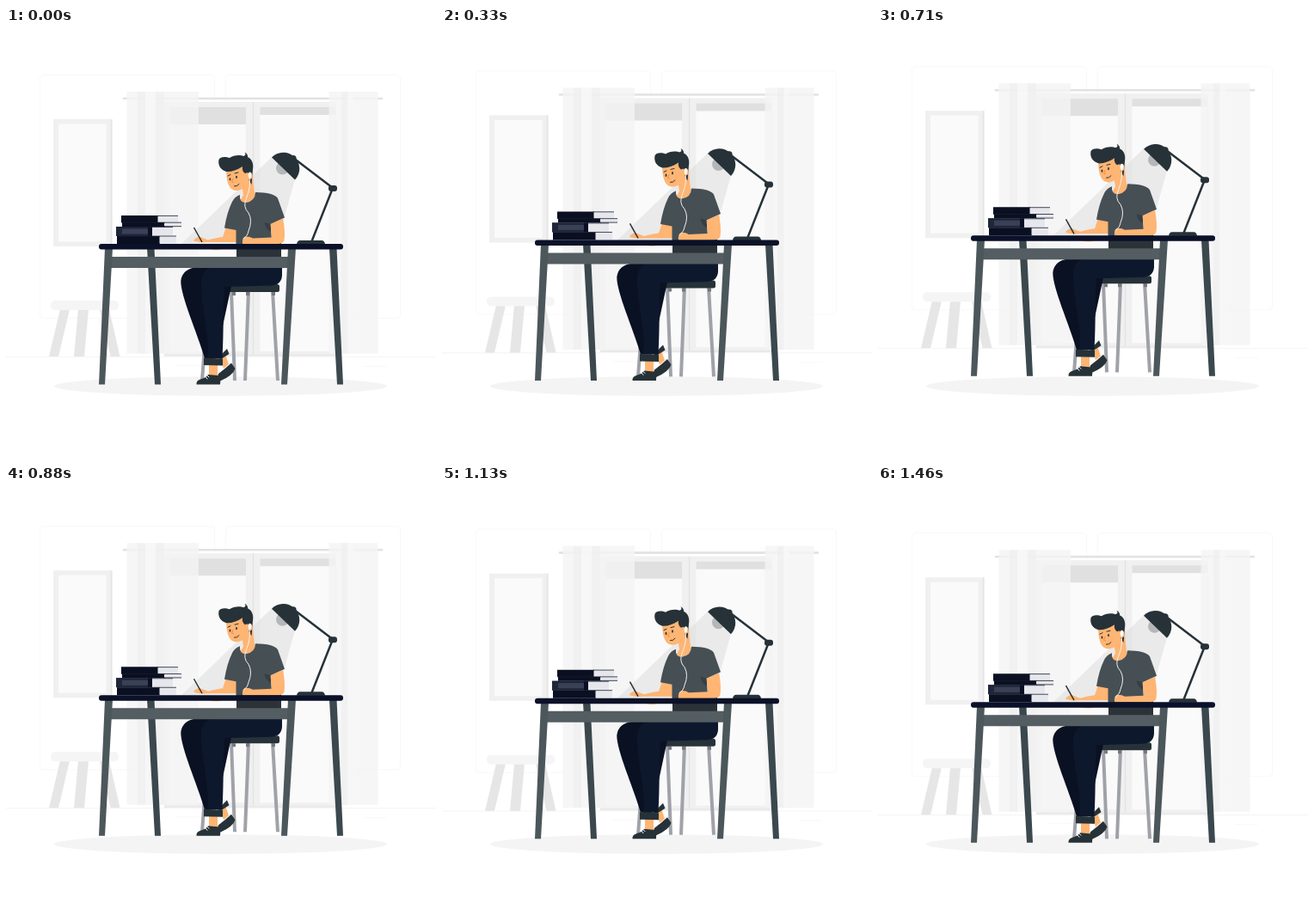
Write an HTML page that moves like this. It is 500x500 px and loops after 1500 ms.

```html
<!DOCTYPE html>
<html lang="en">
<head>
<meta charset="utf-8">
<title>Working at a desk</title>
<style>
  html, body { margin: 0; height: 100%; overflow: hidden; background: #fff; }
  svg { display: block; width: 100%; height: 100%; }
  .line { fill: none; stroke-linecap: round; stroke-linejoin: round; }
  .dark { fill: #263238; }
  .skin { fill: #ffb573; }
</style>
</head>
<body>
<svg viewBox="0 0 500 500">
  <ellipse cx="249.500" cy="416.500" rx="193.500" ry="11.300" fill="#f4f4f4"/>
  <g id="scene">
    <g id="room">
      <g class="line" stroke="#f8f8f8">
        <rect x="39.500" y="54.500" width="203" height="283" rx="4"/>
        <rect x="255.500" y="54.500" width="203" height="283" rx="4"/>
      </g>
      <path d="M0 382.300H500" stroke="#f1f1f1" stroke-width=".8"/>
      <path d="M197 392.500H253M415 393.500H442" stroke="#f5f5f5" stroke-width=".7"/>

      <path d="M55 106H123.500V254H55Z" fill="#f0f0f0"/>
      <path d="M121.500 106H123.500V254H121.500Z" fill="#e6e6e6"/>
      <path d="M61 111.500H116.500V248.500H61Z" fill="#fafafa"/>

      <path d="M184 86H384V381.500H184Z" fill="#f0f0f0"/>
      <path d="M190.500 92H279V376H190.500ZM295.500 92H383V376H295.500Z" fill="#fafafa"/>
      <path d="M190.500 92H279V112H190.500ZM295.500 92H383V101H295.500Z" fill="#e0e0e0"/>
      <path d="M287.500 86V381" stroke="#e3e3e3" stroke-width="1.500"/>
      <path d="M184 380.500H384" stroke="#e9e9e9" stroke-width="2"/>

      <path class="line" d="M137 82H437" stroke="#e2e2e2" stroke-width="2.600"/>
      <g fill="#f5f5f5" fill-opacity=".82">
        <path d="M140.500 74H224V378.500H140.500Z"/>
        <path d="M375.500 74H432.500V378.500H375.500Z"/>
      </g>
      <path d="M153 74H162V378.500H153ZM174 74H184V378.500H174ZM390 74H397.500V378.500H390Z" fill="#efefef" opacity=".6"/>
      <path d="M162 74H174V378.500H162ZM397.500 74H404V378.500H397.500Z" fill="#f8f8f8" opacity=".8"/>

      <path d="M63 327H74L61 382H50ZM84 327H96L91 382H79ZM109 327H120L132.500 382H121.500Z" fill="#e6e6e6"/>
      <rect x="52" y="317" width="79" height="11" rx="5" fill="#f5f5f5"/>
    </g>

    <path d="M309 150L204 251H315L336 176Z" fill="#dcdcdc" opacity=".5"/>

    <g id="lamp">
      <circle cx="321.500" cy="163" r="7.500" fill="#b4b7ba"/>
      <path class="dark" d="M309 150.500A18.700 18.700 0 0 1 336 176.500Z"/>
      <circle class="dark" cx="334" cy="151.500" r="3.600"/>
      <path class="line" d="M336 152.500L380 186L355.500 248" stroke="#263238" stroke-width="2.500"/>
      <rect class="dark" x="375" y="183" width="10" height="7" rx="3"/>
      <path class="dark" d="M338 251.500Q338.500 247 342 247H367Q370.500 247 371 251.500Z"/>
    </g>

    <g id="chair">
      <path d="M262 306L266 410M282 306L278 410M310 306L316 410M231 370L228 410" stroke="#a0a2a9" stroke-width="4"/>
      <path d="M265 307V311M281 307V311M311 307V311" stroke="#75787f" stroke-width="4"/>
      <rect class="dark" x="251" y="298" width="67" height="9" rx="2.500"/>
    </g>

    <g id="legs">
      <path class="skin" d="M249 382L255 379L259 391L253 396ZM236 391H246V406H236Z"/>
      <path class="dark" d="M246 384L257 373L259.500 379L250 385Z"/>
      <path class="dark" d="M247 402Q255 396 262 389.500L266.500 396Q264 404 249 410.500L244 411Z"/>
      <path class="dark" d="M221.500 414.500Q221 410 226 408.500Q232 407 235 403L246 404Q250 406 249 414.500Z"/>
      <path class="line" d="M233 403L236 406M231.500 405L234 408M247 394L249.500 398M249.500 392L252 396" stroke="#fff" stroke-width="1"/>
      <path d="M268 278H222Q205 280 203.300 294C203 312 222 353 231 384H244L262 300Z" fill="#0a1122"/>
      <path d="M321 277V288Q320 299 308 299.500L254 301C252 325 253.500 350 251.500 384H234C238 358 226 326 227 293Q229 279 243 278Z" fill="#0e182d"/>
      <path class="dark" d="M230 383.500L252 384.500V392.500L230 392Z"/>
      <path d="M268 250H320V270H268Z" fill="#2b3338"/>
    </g>

    <g id="person">
      <path class="skin" d="M274 182L287 174L289 192L291 195Q285 204 271 203.500L276 194Z"/>
      <path class="skin" d="M256 162C256 173 257 182 262 187C268 191.500 276 188 279 183L282 177Q288 174 286 168Q284 165 280 168L276 157Z"/>
      <path class="dark" d="M247.500 153C249 149 256 149.500 260 151C264 148 272 147 276 149Q280 148 277.500 144.500Q281.500 146.500 281 150C286 152 288 158 287 164L285.500 182Q281 176 281 168L278 169Q274 166 275 161C268 165.500 262 167.500 256 167C250 165 246 160 247.500 153Z"/>
      <ellipse class="skin" cx="283.500" cy="172" rx="3" ry="4"/>
      <g class="line" stroke="#263238" stroke-width="1">
        <path d="M258 172L261 170.500M266 169L270 168"/>
        <path d="M260.500 175V176.500M268 172.500V174" stroke-width="1.700"/>
        <path d="M265.500 184Q269 184.500 271 181.500"/>
        <path d="M264 175L262.500 179L264.500 179.500" stroke="#e5914b"/>
      </g>

      <path class="skin" d="M256 231L268 234V249H233Q226 250 218 247.500Q220 242.500 226 243L235 246.500Q245 243.500 252 243Z"/>
      <path class="skin" d="M235 256.500Q245 260 253 256.500Z"/>
      <path d="M218.500 232L228 249" stroke="#263238" stroke-width="1.500"/>

      <path d="M272 194Q266 196 263 202Q257 214 254 232.500L267.500 235V251H309L308 228L324 220.500L316 198Q311 191 290 191Q290 201 279 203Q271 203 272 194Z" fill="#464f54"/>
      <path d="M300.500 226L308 228V237Q302 234 300.500 226Z" fill="#353f45"/>
      <path class="skin" d="M307.500 228L322 221.500Q325 237 323.500 247Q322 251 316 251H275Q274 245 278 242.500Q283 242 287 244.500L309 243.500Z"/>
      <path class="line" d="M283 173Q285 185 279.500 198Q275 208 282 215Q287 224 282 236Q281 242 276 245" stroke="#f2f2f2" stroke-width="1"/>
      <ellipse cx="283.500" cy="171" rx="1.800" ry="3.500" fill="#fff"/>
    </g>

    <g id="books">
      <path d="M134 218H177V226H134ZM135 226H185V231H135ZM129 242H179V251H129Z" fill="#0a1021"/>
      <path d="M176.500 218.500H200V226H176.500ZM184 226.500H204.500V230.500H184ZM170 232H194V241.500H170ZM178.500 242.500H198V250.500H178.500Z" fill="#e6e7ec"/>
      <path d="M128 231H170V242H128Z" fill="#20273a"/>
      <path d="M135 233.500H165V239.500H135Z" fill="#3a4157"/>
      <path d="M165 231H170V242H165Z" fill="#0a1021"/>
      <path d="M176 218.400H200M134 226.200H204M184 230.700H204M128 231.500H194M129 242H198" stroke="#161d30" stroke-width=".8"/>
    </g>

    <g id="desk">
      <path d="M164 256H172.500L180 414.500H173ZM376 256H384.500L392 414.500H385Z" fill="#3b484d"/>
      <path d="M119 266H332V279H119Z" fill="#535d62"/>
      <path d="M115 256H124L115 414.500H108ZM328 256H337L327 414.500H320Z" fill="#4c575c"/>
      <rect x="108" y="251" width="284" height="6.500" rx="3" fill="#0b1128"/>
    </g>
  </g>
</svg>
<script>
  const LOOP = 1500, STEPS = 36, PEAK = 17.3, SPEED = 0.57;
  const scene = document.getElementById("scene");
  const start = performance.now();

  // The scene floats up and down at constant speed, stepped at 24 fps.
  function draw(now) {
    const time = Math.max(0, now - start) % LOOP;
    const step = Math.floor((time + 5) / LOOP * STEPS) % STEPS;
    const lift = (Math.abs(step - PEAK) - PEAK) * SPEED;
    scene.setAttribute("transform", `translate(0 ${lift.toFixed(2)})`);
    requestAnimationFrame(draw);
  }
  draw(start);
</script>
</body>
</html>
```
